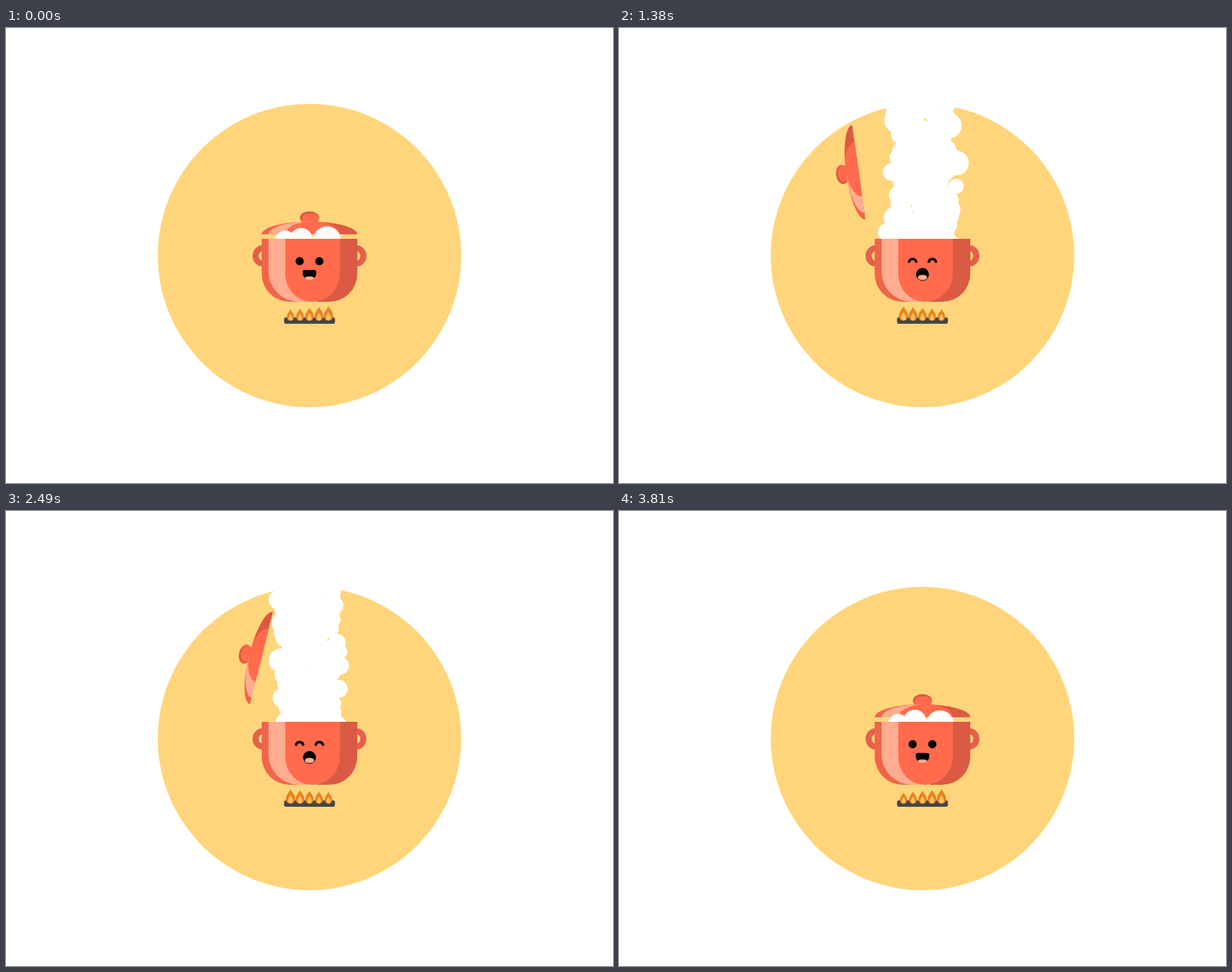
An HTML page for the animation above (3.84 s loop, 800 by 600 pixels).

```html
<!DOCTYPE html>
<html lang="en">
<head>
<meta charset="utf-8">
<title>Boiling pot</title>
<style>
  html, body { margin: 0; width: 100%; height: 100%; overflow: hidden; background: #fff; }
  svg { display: block; width: 100vw; height: 100vh; }
  .main { fill: #ff6b4c; }
  .edge { fill: #f0654a; }
  .dark { fill: #db5a43; }
  .pink { fill: #ffac91; }
</style>
</head>
<body>
<svg viewBox="0 0 800 600">
  <defs>
    <clipPath id="potShape"><path d="M337 278H463V324A37 37 0 0 1 426 361H374A37 37 0 0 1 337 324Z"/></clipPath>
    <clipPath id="lidShape"><path d="M-63 0A63 17 0 0 1 63 0Z"/></clipPath>
    <g id="flame">
      <path fill="#e8831d" d="M0 -19C2 -15.5 6.2 -11.5 6.2 -6A6.2 6 0 0 1 -6.2 -6C-6.2 -11.5 -2 -15.5 0 -19Z"/>
      <path fill="#fcbf62" d="M0 -11.5C1 -9 3.2 -7 3.2 -4A3.2 3.6 0 0 1 -3.2 -4C-3.2 -7 -1 -9 0 -11.5Z"/>
    </g>
  </defs>

  <circle cx="400" cy="300" r="200" fill="#ffd57b"/>

  <g id="lid">
    <ellipse class="dark" cy="-22" rx="12.7" ry="8.5"/>
    <ellipse class="main" cx="1" cy="-20.7" rx="11" ry="7.2"/>
    <g clip-path="url(#lidShape)">
      <rect class="edge" x="-63" y="-17" width="63" height="17"/>
      <rect class="dark" x="0" y="-17" width="63" height="17"/>
      <path class="pink" d="M-54 0A54 17 0 0 1 4 -17V0Z"/>
      <ellipse class="main" cx="4" rx="36" ry="17"/>
    </g>
  </g>

  <path id="steam" fill="#fff"/>

  <g fill="none" stroke="#e4604a" stroke-width="8">
    <path d="M338 290.5A9 10 0 0 0 338 310.5"/>
    <path d="M462 290.5A9 10 0 0 1 462 310.5"/>
  </g>
  <g clip-path="url(#potShape)">
    <rect class="edge" x="337" y="278" width="70" height="83"/>
    <rect class="dark" x="400" y="278" width="63" height="83"/>
    <path class="pink" d="M346 278H410V361H386A40 40 0 0 1 346 321Z"/>
    <path class="main" d="M368 278H440V324A37 37 0 0 1 403 361A35 37 0 0 1 368 324Z"/>
  </g>

  <g id="calm">
    <circle cx="387" cy="307.5" r="5.4"/>
    <circle cx="413" cy="307.5" r="5.4"/>
    <path d="M394 319H406Q409 319 409 322Q409 329.5 404 330H396Q391 329.5 391 322Q391 319 394 319Z"/>
    <ellipse class="pink" cx="400" cy="329.8" rx="5.8" ry="2.4"/>
  </g>
  <g id="gasp">
    <path d="M382 309.5C383 303 391 303 392 309.5M408 309.5C409 303 417 303 418 309.5" fill="none" stroke="#000" stroke-width="3.2"/>
    <circle cx="400" cy="325" r="8.5"/>
    <ellipse class="pink" cx="400" cy="329" rx="6.2" ry="3.4"/>
  </g>

  <rect x="366.5" y="381.5" width="67" height="8.5" rx="2.5" fill="#454545"/>
  <g id="fire"></g>
</svg>

<script>
const LOOP = 3840, OPEN = 550, CLOSE = 2700;
const SPEED = 0.47, SOURCE = 290;
const $ = id => document.getElementById(id);
const clamp = v => Math.min(1, Math.max(0, v));
const lerp = (a, b, p) => a + (b - a) * p;
const wave = (t, period) => Math.cos(2 * Math.PI * t / period);

let seed = 11;
const rand = () => (seed = seed * 16807 % 2147483647) / 2147483647;

// Golden-ratio steps spread the puffs evenly across the opening
const puffs = [];
for (let born = 558, i = 1; born < 2572; born += 5, i++) {
  const across = i * 0.618 % 1 * 2 - 1;
  const x = 401 + across * 38 + (rand() - 0.5) * 18 + 4 * wave(born, 390);
  puffs.push({ x, r: 9 + rand() * 8, born });
}

const bubbles = [
  { x: 365, y: 283, r: 13 },
  { x: 389, y: 277, r: 15 },
  { x: 426, y: 279, r: 18.5 }
];

const flames = [0, 1, 2, 3, 4].map(() => {
  const use = document.createElementNS("http://www.w3.org/2000/svg", "use");
  use.setAttribute("href", "#flame");
  return $("fire").appendChild(use);
});

const disc = (x, y, r) =>
  `M${(x - r).toFixed(2)} ${y.toFixed(2)}a${r} ${r} 0 1 1 ${2 * r} 0a${r} ${r} 0 1 1 ${-2 * r} 0`;

function steamPath(t) {
  let d = "";
  for (const { x, r, born } of puffs) {
    const y = SOURCE - (t - born) * SPEED;
    if (y <= SOURCE + 10 && y > 60) d += disc(x, y, r);
  }
  bubbles.forEach(({ x, y, r }, i) => {
    d += disc(x + 3 * wave(t + 160 * i, 640), y - 3 * wave(t + 110 * i, 320), r);
  });
  return d;
}

function lidPose(t) {
  const up = 1 - (1 - clamp((t - OPEN) / 270)) ** 2;
  const down = (1 - Math.cos(Math.PI * clamp((t - 2425) / 265))) / 2;
  // Hovering lid rocks about its lower end
  const tilt = -91.5 - 6.5 * wave(t - 900, 480);
  const a = tilt * Math.PI / 180;
  const hoverX = 325 + 62.5 * Math.cos(a), hoverY = 252 + 62.5 * Math.sin(a);
  const shake = 0.5 + (t < OPEN ? 2 * t / OPEN : 0);
  const restY = 272.3 - shake * (1 - wave(t, 120)) / 2;
  const p = up * (1 - down);
  const x = lerp(400, hoverX, p);
  const y = lerp(restY, hoverY, up * (1 - down ** 1.5));
  return `translate(${x} ${y}) rotate(${tilt * p})`;
}

function draw(t) {
  $("lid").setAttribute("transform", lidPose(t));
  $("steam").setAttribute("d", steamPath(t));
  const open = t >= OPEN && t < CLOSE;
  $("calm").style.display = open ? "none" : "";
  $("gasp").style.display = open ? "" : "none";
  flames.forEach((flame, i) => {
    const size = 0.89 + 0.055 * (i - 2) * wave(t, 960);
    flame.setAttribute("transform", `translate(${375 + 12.5 * i} 386) scale(${size})`);
  });
}

const start = performance.now();
function tick() {
  draw((performance.now() - start) % LOOP);
  requestAnimationFrame(tick);
}
tick();
</script>
</body>
</html>
```
